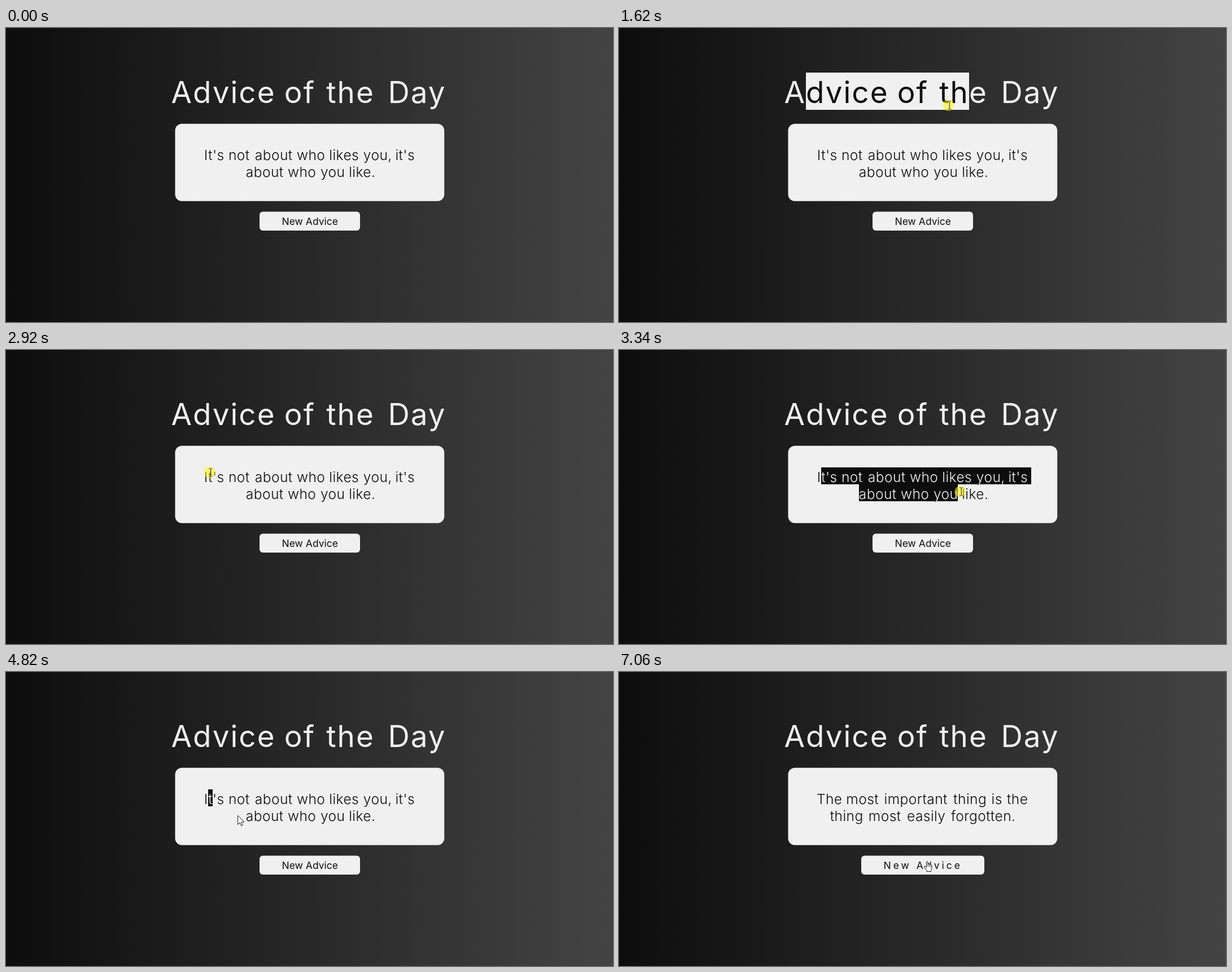
An HTML page with a canvas that plays this animation: 1075 px wide and 521 px high, repeating every 8000 ms.

```html
<!DOCTYPE html>
<html lang="en">
<head>
<meta charset="utf-8">
<title>Advice of the Day</title>
<style>
html, body { margin: 0; width: 100%; height: 100%; overflow: hidden; background: #0d0d0d; }
canvas { display: block; }
</style>
</head>
<body>
<canvas id="stage" width="1075" height="521"></canvas>
<script>
const ctx = document.getElementById('stage').getContext('2d');
const LOOP = 8000, DARK = '#0d0d0d', LIGHT = '#f0f0f0';
const SELECT_LAG = 70, ADVICE_CHANGE = 7060;

// Pointer path: time, x, y
const path = [
  [250, 996, 510], [600, 650, 300], [960, 333, 105], [1080, 333, 105],
  [1300, 480, 120], [1480, 610, 139], [1550, 615, 139], [1620, 584, 137],
  [1830, 441, 125], [2070, 335, 106], [2200, 333, 105], [2650, 362, 218],
  [2720, 360, 217], [2920, 360, 217], [3100, 460, 228], [3270, 600, 250],
  [3340, 604, 251], [3500, 640, 255], [3720, 600, 250], [3790, 570, 247],
  [3990, 420, 229], [4070, 417, 228], [4300, 370, 224], [4540, 364, 224],
  [4610, 364, 224], [5000, 450, 280], [5380, 535, 334], [5500, 545, 335.5]
];
const presses = [[1080, 2150], [2920, 4600], [6340, 6480]];

const titleStyle = { font: '400 53px Inter, sans-serif', spacing: 2 };
const bodyStyle = { font: '300 24.6px Inter, sans-serif', spacing: 0.4 };

// Words with the x of their centres; carets hold every insertion point.
function makeLine(style, y, words) {
  setStyle(style);
  const line = { style, y, words: [], carets: [] };
  for (const [text, center] of words) {
    const x = center - (ctx.measureText(text).width - style.spacing) / 2;
    line.words.push({ text, x });
    for (let i = 0; i <= text.length; i++)
      line.carets.push(x + ctx.measureText(text.slice(0, i)).width);
  }
  return line;
}

function setStyle({ font, spacing }) {
  ctx.font = font;
  ctx.letterSpacing = spacing + 'px';
}

const title = makeLine(titleStyle, 133, [['Advice', 384], ['of', 519.5], ['the', 609], ['Day', 727]]);
const firstAdvice = [
  makeLine(bodyStyle, 234, [["It's", 368.5], ['not', 412.5], ['about', 474], ['who', 540],
    ['likes', 598.5], ['you,', 658], ["it's", 706.5]]),
  makeLine(bodyStyle, 264, [['about', 458], ['who', 524], ['you', 578.5], ['like.', 630.5]])
];
const secondAdvice = [
  makeLine(bodyStyle, 234, [['The', 372.5], ['most', 431], ['important', 525.5],
    ['thing', 621.5], ['is', 669], ['the', 705.5]]),
  makeLine(bodyStyle, 264, [['thing', 403], ['most', 470.5], ['easily', 544], ['forgotten.', 645]])
];

const background = ctx.createLinearGradient(0, 0, 1075, 0);
background.addColorStop(0, DARK);
background.addColorStop(1, '#444444');

const clamp01 = v => Math.max(0, Math.min(1, v));
const within = (x, y, l, t, r, b) => x >= l && x <= r && y >= t && y <= b;

function pointerAt(t) {
  const next = path.findIndex(p => p[0] > t);
  if (next < 0) return path[path.length - 1].slice(1);
  if (next === 0) return path[0].slice(1);
  const [t0, x0, y0] = path[next - 1], [t1, x1, y1] = path[next];
  const u = (t - t0) / (t1 - t0);
  return [x0 + (x1 - x0) * u, y0 + (y1 - y0) * u];
}

function drawLine(line, color) {
  setStyle(line.style);
  ctx.fillStyle = color;
  for (const { text, x } of line.words) ctx.fillText(text, x, line.y);
}

function drawSelection(line, from, to, top, height, back, color) {
  const left = Math.round(Math.min(from, to)), right = Math.round(Math.max(from, to));
  if (left === right) return;
  ctx.save();
  ctx.beginPath();
  ctx.rect(left, top, right - left, height);
  ctx.clip();
  ctx.fillStyle = back;
  ctx.fillRect(left, top, right - left, height);
  drawLine(line, color);
  ctx.restore();
}

const nearestCaret = (line, x) =>
  line.carets.reduce((best, c) => Math.abs(c - x) < Math.abs(best - x) ? c : best);

function roundBox(x, y, w, h, r) {
  ctx.fillStyle = LIGHT;
  ctx.beginPath();
  ctx.roundRect(x, y, w, h, r);
  ctx.fill();
}

function drawTitle(t) {
  drawLine(title, LIGHT);
  if (t < 1080 || t > 2150) return;
  const [x] = pointerAt(Math.max(1080, t - SELECT_LAG));
  drawSelection(title, title.carets[1], nearestCaret(title, x), 79, 66, LIGHT, DARK);
}

function drawAdvice(t) {
  const lines = t < ADVICE_CHANGE ? firstAdvice : secondAdvice;
  lines.forEach(line => drawLine(line, DARK));
  if (t < 2920 || t >= ADVICE_CHANGE) return;
  const [top, bottom] = lines;
  const [x, y] = pointerAt(Math.max(2920, Math.min(t - SELECT_LAG, 4540)));
  const onSecond = y > 238;
  drawSelection(top, top.carets[1], onSecond ? 730 : nearestCaret(top, x), 208, 30, DARK, LIGHT);
  if (onSecond)
    drawSelection(bottom, bottom.carets[0], nearestCaret(bottom, x), 238, 30, DARK, LIGHT);
}

function drawButton(t) {
  const u = clamp01((t - 5550) / 650) ** 0.7;
  const spacing = 4 * u * u * (3 - 2 * u);
  const width = 178 + 10 * spacing, left = 538 - width / 2;
  roundBox(left, 325.5, width, 33.5, 6);
  setStyle({ font: '400 17.5px Inter, sans-serif', spacing });
  ctx.fillStyle = DARK;
  ctx.fillText('New Advice', left + 39.5, 349);
}

const arrow = new Path2D('M0 0V16L3.8 12.6L6.2 18.2L8.6 17.2L6.2 11.6H11.4Z');
const beam = new Path2D('M-1-7H1.4M2.6-7H5M2-6.5V6.5M-1 7H1.4M2.6 7H5');
const hand = new Path2D('M-.5 1Q.8-.5 2 1V5Q3.5 4 4.5 5.4Q6 4.6 7 6Q8.6 5.6 9 7.4' +
  'V12Q9 14.5 7.5 16V18H0V16.2L-4.5 10.5Q-5 8.5-3 8.8L-.5 11Z');
const knuckles = new Path2D('M2 5V9M4.5 6V9.5M7 7V10');

function drawPointer(t) {
  if (t < 250) return;
  const [x, y] = pointerAt(t);
  if (presses.some(([start, end]) => t >= start && t < end)) {
    ctx.fillStyle = 'rgba(255, 248, 10, 0.56)';
    ctx.beginPath();
    ctx.arc(x, y, 10, 0, 7);
    ctx.fill();
  }
  const overText = within(x, y, 295, 79, 780, 145) ||
    within(x, y, 352, 208, 730, 238) || within(x, y, 423, 238, 653, 268);
  const overButton = within(x, y, 449, 326, 627, 359);
  ctx.save();
  ctx.translate(x, y);
  ctx.lineWidth = 1;
  ctx.strokeStyle = '#1a1a1a';
  ctx.fillStyle = '#fff';
  if (overText) {
    ctx.stroke(beam);
  } else {
    const shape = overButton ? hand : arrow;
    ctx.fill(shape);
    ctx.stroke(shape);
    if (overButton) ctx.stroke(knuckles);
  }
  ctx.restore();
}

function draw(t) {
  ctx.fillStyle = background;
  ctx.fillRect(0, 0, 1075, 521);
  roundBox(299.5, 169.7, 476.7, 137, 12);
  drawTitle(t);
  drawAdvice(t);
  drawButton(t);
  drawPointer(t);
}

const start = performance.now();
function tick() {
  draw((performance.now() - start) % LOOP);
  requestAnimationFrame(tick);
}
tick();
</script>
</body>
</html>
```
